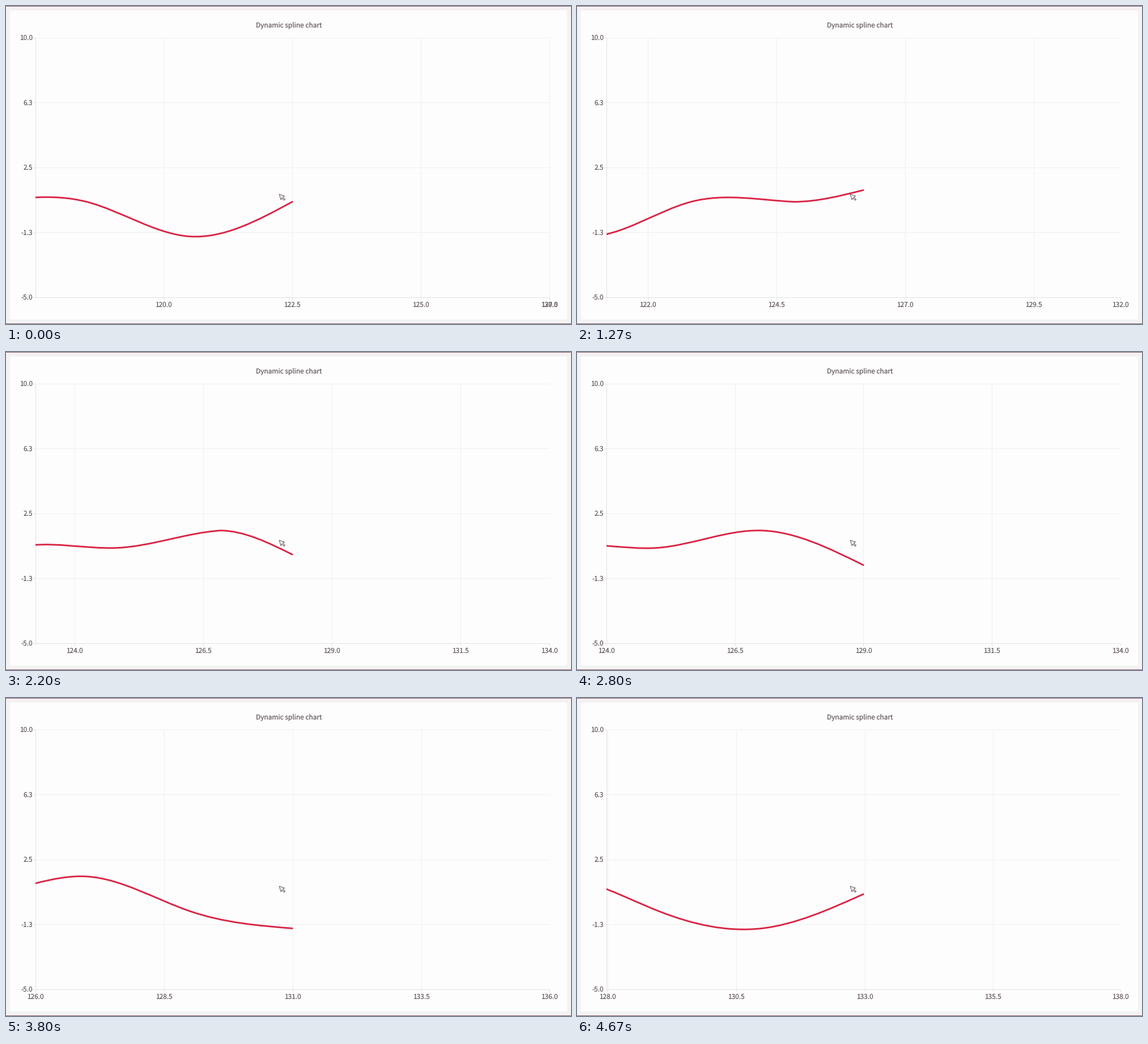
Animation, 997 px wide and 561 px high, one loop 4740 ms. Source, as a matplotlib script:

```python
import numpy as np
import matplotlib as mpl
import matplotlib.pyplot as plt
from matplotlib.animation import FuncAnimation
from matplotlib.patches import FancyBboxPatch, PathPatch, Polygon, Rectangle
from matplotlib.path import Path

W, H, DPI = 997, 561, 64
PX = 72 / DPI                       # points per pixel
LOOP, STEP_MS = 4740, 20
LEFT, RIGHT, TOP, BOTTOM = 51.5, 959.0, 55.5, 513.5
MID = (LEFT + RIGHT) / 2
TICKS = np.linspace(LEFT, RIGHT, 5)
SHIFT = (RIGHT - LEFT) / 5          # distance between data points

INK, GRID, AXIS, RED = "#62595b", "#f0eff0", "#e2e1e2", "#d92545"

VALUES = np.array([1.5, .5, .5, .5, -1.5, .5, .5, 1.5, -.5, -1.5, .5])
FIRST_COUNT = 6                     # points present before the first scroll

SCROLL_STARTS = [0, 960, 1942, 2988, 3925]
SCROLL_MS = 1000
FPS = 15
FRESH = 63 / 67                     # share of video ticks with a new picture

mpl.rcParams["font.family"] = "Noto Sans CJK JP"
mpl.rcParams["text.hinting"] = "none"

fig = plt.figure(figsize=(W / DPI, H / DPI), dpi=DPI, facecolor="#f4f3f4")
ax = fig.add_axes([0, 0, 1, 1])
ax.set_xlim(0, W)
ax.set_ylim(H, 0)
ax.axis("off")


def rect(x, y, w, h, color):
    ax.add_patch(Rectangle((x, y), w, h, fc=color, lw=0, zorder=0))


def line(xs, ys, color, z=1):
    return ax.plot(xs, ys, color=color, lw=PX, zorder=z,
                   solid_capstyle="butt")[0]


def label(x, y, text, ha="center"):
    return ax.text(x, y, text, ha=ha, va="baseline", color=INK,
                   fontsize=11.9 * PX, zorder=4)


def spline(count):
    """Points and Bezier handles of a natural spline ending at mid-chart."""
    v = 360.7 - VALUES[:count] * (BOTTOM - TOP) / 15
    pts = np.column_stack([MID - SHIFT * np.arange(count - 1, -1, -1), v])
    m = np.diag(np.full(count, 4.0))
    m += np.eye(count, k=1) + np.eye(count, k=-1)
    m[0, 0] = m[-1, -1] = 2
    rhs = np.empty_like(pts)
    rhs[1:-1] = 3 * (pts[2:] - pts[:-2])
    rhs[0] = 3 * (pts[1] - pts[0])
    rhs[-1] = 3 * (pts[-1] - pts[-2])
    slope = np.linalg.solve(m, rhs)
    handles = np.stack([pts[:-1] + slope[:-1] / 3,
                        pts[1:] - slope[1:] / 3], axis=1)
    return pts, handles


def scrolled_path(scroll, p):
    """Blend the spline before the scroll into the one with a new point."""
    count = FIRST_COUNT + scroll
    pts0, han0 = spline(count)
    pts1, han1 = spline(count + 1)
    tip = pts0[-1]                  # the new segment grows out of the tip
    pts0 = np.vstack([pts0, tip])
    han0 = np.concatenate([han0, [[tip, tip]]])
    pts = pts0 + (pts1 - pts0) * p
    han = han0 + (han1 - han0) * p
    verts = [pts[0]]
    for (a, b), q in zip(han, pts[1:]):
        verts += [a, b, q]
    return Path(verts, [Path.MOVETO] + [Path.CURVE4] * (len(verts) - 1))


# Window and card
rect(0, 0, W, 8, "#f5f1f3")
ax.add_patch(FancyBboxPatch((9, 10), 979, 541, fc="#fefdfe", lw=0, zorder=0.5,
                            boxstyle="round,pad=2,rounding_size=2"))
rect(0, 0, W, 1, "#87606a")
rect(0, H - 1, W, 1, "#87606a")

# Fixed parts of the chart
label(498.9, 38.3, "Dynamic spline chart")
for y, text in zip(np.linspace(TOP, BOTTOM, 5),
                   ["10.0", "6.3", "2.5", "-1.3", "-5.0"]):
    line([LEFT, RIGHT], [y, y], GRID)
    line([LEFT - 4, LEFT], [y, y], AXIS)
    label(47.4, y + 4.8, text, "right")
line([LEFT, LEFT], [TOP, BOTTOM], AXIS, 2)
line([LEFT, RIGHT], [BOTTOM, BOTTOM], AXIS, 2)

# Moving parts
grid = [line([x, x], [TOP, BOTTOM], GRID) for x in TICKS[:4]]
marks = [line([x, x], [BOTTOM, BOTTOM + 4], AXIS) for x in TICKS]
names = [label(x, 531.2, "") for x in TICKS]
curve = PathPatch(scrolled_path(0, 0), fc="none", ec=RED, lw=2.9 * PX,
                  capstyle="round", joinstyle="round", zorder=3)
ax.add_patch(curve)
curve.set_clip_path(Rectangle((LEFT, TOP), RIGHT - LEFT, BOTTOM - TOP,
                              transform=ax.transData))

# Mouse pointer
ax.add_patch(Polygon([(482.2, 332.1), (491.4, 335.2), (488.4, 337.2),
                      (492.4, 341.2), (490.8, 342.7), (486.9, 338.8),
                      (485.2, 341.8)], fc="#fefdfe", ec="#5c4f53",
                     lw=PX, joinstyle="round", zorder=5))


def scroll_state(ms):
    """Number of the running scroll and its eased progress."""
    tick = int((ms + 14) * FPS / 1000)
    shown = int(tick * FRESH + 0.02) * 1000 / (FPS * FRESH)
    scroll = int(np.searchsorted(SCROLL_STARTS, shown, side="right")) - 1
    t = min((shown - SCROLL_STARTS[scroll]) / SCROLL_MS, 1)
    return scroll, 1 - (1 - t) ** 4


def update(i):
    scroll, p = scroll_state(i * STEP_MS)

    # Each tick slides in from its right neighbour; the last one stays.
    start = np.append(TICKS[1:], RIGHT)
    xs = start + (TICKS - start) * p
    for g, x in zip(grid, xs):
        g.set_xdata([x, x])
    for j, (mark, name, x) in enumerate(zip(marks, names, xs)):
        mark.set_xdata([x, x])
        name.set_x(x)
        name.set_text(f"{120 + 2 * scroll + 2.5 * j:.1f}")
    curve.set_path(scrolled_path(scroll, p))
    return [*grid, *marks, *names, curve]


anim = FuncAnimation(fig, update, frames=LOOP // STEP_MS, interval=STEP_MS,
                     repeat=True, repeat_delay=0, blit=False)
plt.show()
```
